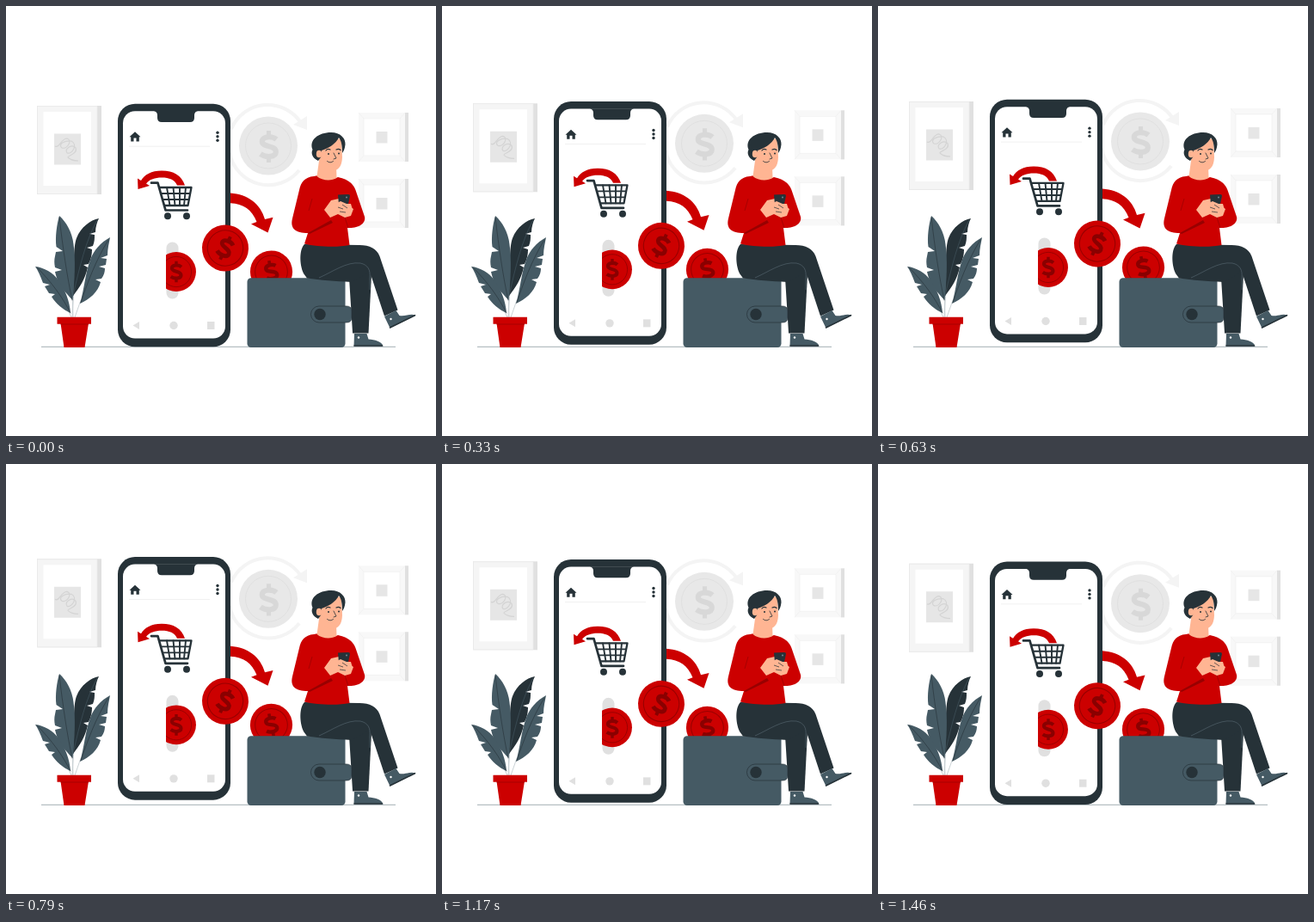
These frames come from a looping animation (500x500 px, 1500 ms). An HTML page:

```html
<!DOCTYPE html>
<html lang="en">
<head>
<meta charset="utf-8">
<title>Mobile cashback</title>
<style>
  html, body { margin: 0; width: 100%; height: 100%; overflow: hidden; background: #fff; }
  svg { display: block; width: 100%; height: 100%; }
  .dark { fill: #263238; }
  .slate { fill: #455a64; }
  .red { fill: #c00; }
  .skin { fill: #ffb593; }
  .line { fill: none; stroke: #263238; stroke-linecap: round; stroke-linejoin: round; }
</style>
</head>
<body>
<svg viewBox="0 0 500 500">
  <defs>
    <g id="dollar" fill="none" stroke-width="4.8">
      <path d="M7-6.500C3-10-6-9.500-6-4.600C-6 1 6.500-1.600 6.500 4.700C6.500 10-3 10-7.500 6.600"/>
      <path d="M0-14.500V-8M0 8V14.500" stroke-width="4"/>
    </g>
    <g id="coin">
      <circle class="red" r="27"/>
      <circle r="20.700" fill="none" stroke="#900" stroke-width="1.100"/>
      <use href="#dollar" stroke="#8a0000"/>
    </g>
    <g id="frame">
      <path d="M0 0H58V57H0z" fill="#f8f8f8"/>
      <path d="M54 0H58V57H54z" fill="#e0e0e0"/>
      <path d="M6 7H48V50H6z" fill="#fff"/>
      <path d="M0 0L6 7H48L54 0M0 57L6 50H48L54 57M6 7V50M48 7V50" fill="none" stroke="#efefef" stroke-width=".7"/>
      <path d="M20.500 22H33.500V35.500H20.500z" fill="#e6e6e6"/>
    </g>
    <clipPath id="slot"><path d="M186 280H230V340H186z"/></clipPath>
  </defs>

  <path d="M41 396.300H453" stroke="#455a64" stroke-width=".5"/>

  <g id="floating">
    <!-- wall -->
    <path d="M36 116H111V219H36z" fill="#e0e0e0"/>
    <path d="M36.500 116.500H106V218.500H36.500z" fill="#f5f5f5" stroke="#ebebeb" stroke-width=".7"/>
    <path d="M43.500 123H99V209H43.500z" fill="#fff"/>
    <path d="M56 148.500H87V184.500H56z" fill="#e6e6e6"/>
    <path d="M57 163C62 166 64 154 71 154C78 156 71 167 65 165C60 161 68 156 76 157C84 161 77 173 71 171C67 166 77 160 81 165C84 172 71 174 72 176C75 179 79 180 84 180" fill="none" stroke="#d4d4d4" stroke-width="1.200"/>
    <use href="#frame" x="410" y="124"/>
    <use href="#frame" x="410" y="201"/>

    <!-- wall coin -->
    <path d="M262 143A46 46 0 0 1 343 136M341 191A46 46 0 0 1 260 171" fill="none" stroke="#f4f4f4" stroke-width="4"/>
    <path d="M350 128V144L334 138z" fill="#f4f4f4"/>
    <circle cx="305" cy="162.500" r="34" fill="#e8e8e8"/>
    <circle cx="305" cy="162.500" r="26.500" fill="none" stroke="#dedede" stroke-width=".8"/>
    <use href="#dollar" transform="translate(305.500 163.500) scale(1.280)" stroke="#d8d8d8"/>

    <!-- phone -->
    <rect class="dark" x="130" y="113.700" width="131" height="282.600" rx="20"/>
    <rect x="136" y="122.200" width="119" height="264.300" rx="14" fill="#fff"/>
    <path class="dark" d="M172 122H223Q219 123 219 127V130Q219 135 214 135H181Q176 135 176 130V127Q176 123 172 122z"/>
    <path class="dark" d="M150 146.300L156.500 152.300H154.800V157.500H151.500V153.500H148.500V157.500H145.200V152.300H143.500z"/>
    <g class="dark">
      <circle cx="246" cy="147.200" r="1.700"/>
      <circle cx="246" cy="151.700" r="1.700"/>
      <circle cx="246" cy="156.200" r="1.700"/>
    </g>
    <path d="M143 163.200H237" stroke="#ececec" stroke-width=".8"/>
    <g fill="#e0e0e0">
      <path d="M155 367V376L147.500 371.500z"/>
      <circle cx="195" cy="371.500" r="4.700"/>
      <path d="M234 367H242.500V376H234z"/>
      <rect x="186.500" y="274.500" width="14" height="66" rx="7"/>
    </g>

    <!-- cart -->
    <path class="red" d="M208 208.500C204 197 195 191.500 181 191.500C169 191.500 161 196 157 203L153 200.500L153.500 213L167 209L163 206.500C167 201.500 173 199.500 181 199.500C190 199.500 196 202 199 208.500z"/>
    <g class="line" stroke-width="2.700">
      <path d="M169 205.700H176.500L185.500 237.500H211"/>
      <path d="M178.500 211H215.500L211.500 232H184.500" stroke-width="2.300"/>
      <path d="M180.500 218H214M182.500 225H212.500M187 211L190.500 232M194.500 211L196.500 232M202 211V232M209 211L207 232" stroke-width="1.900"/>
    </g>
    <circle class="dark" cx="188" cy="244.300" r="4"/>
    <circle class="dark" cx="210" cy="244.300" r="4"/>

    <!-- payback -->
    <path class="red" d="M261 217.500C281 219 296 230 301 248L310.500 245.700L304.500 263.500L285 253.500L291.500 251C286 237 276 230 261 229.300z"/>
    <g clip-path="url(#slot)"><use href="#coin" transform="translate(198 309) scale(.850)"/></g>
    <use href="#coin" transform="translate(255 281.500) rotate(24)"/>
    <use href="#coin" transform="translate(308.500 309) scale(.910) rotate(-12)"/>
  </g>

  <!-- plant -->
  <path d="M77 335L78 362M79 330L77 362M87 342L80 362M70 350L76 362" fill="none" stroke="#c5cdd1" stroke-width=".9"/>
  <path class="dark" d="M108 247C98 249 87 257 82 270C78 280 79 305 78 337C85 328 92 318 95 304L90 301L96 300C99 294 100 289 100 283L94 281L101 279C103 274 103 270 103 266L97 265L104 263C104 257 106 251 108 247z"/>
  <path class="slate" d="M62 244C70 251 77 263 78.500 277C81 294 80 319 77.500 342C69 333 61 325 58 313L57 309L65 307L57 304C56 299 56 295 57 291L58 286L66 285L58.500 280C57 269 59 254 62 244z"/>
  <path class="slate" d="M121 269C110 275 102 284 98 295C92 311 91 330 86 346C97 341 107 333 110 321L104 318L111 317C114 313 115 309 115 305L108 303L116 301L117 294L110 293L118 290C118 282 120 275 121 269z"/>
  <path class="slate" d="M34 303C44 304 55 310 61 319C69 330 74 343 75 357C66 353 58 346 53 338L57 335L50 334L45 326L51 324L43 322C40 314 37 307 34 303z"/>
  <path class="line" d="M62 246C66 280 71 315 77 342M119 272C104 296 94 324 87 345M36 304C53 321 66 339 75 357" stroke-width=".6"/>
  <path d="M106 249C93 272 85 305 78 337" fill="none" stroke="#455a64" stroke-width=".6"/>
  <path class="red" d="M63.500 369H96L91.500 397H67.500zM59.500 361.700H99V369.700H59.500z"/>
  <path d="M63.500 370H96" stroke="#900" stroke-width=".7"/>

  <!-- wallet and legs -->
  <rect class="slate" x="280.500" y="316.300" width="114" height="80.700" rx="4.500"/>
  <path class="dark" d="M399 316L403 380.500H421.500L425 312L420 298z"/>
  <path class="dark" d="M347 277C341 283 341 300 346 311L350 316.500C366 319 382 320 402 321L423 309L440 360.500L455.500 353.500L434.500 291C431 282 423 278 411 278z"/>
  <path d="M364 316C380 309 396 297 412 299C421 301 424 307 423 316V330" fill="none" stroke="#596b74" stroke-width=".6"/>
  <path class="slate" d="M440 361L453.500 354L457.500 360C464 361.500 470 357 476 359.500L446.500 374.500zM405 381H419.500L421.500 387.500C429 388 437 390 438.500 395.500H404.500z"/>
  <path class="line" d="M446.500 374L475.500 359.700M405 395H437.500" stroke-width="1.600"/>
  <circle cx="447.500" cy="364" r="1.200" fill="#fff"/>
  <circle cx="410" cy="385.500" r="1.200" fill="#fff"/>
  <path class="slate" d="M364 349H396Q402 349 402 355V362Q402 368 396 368H364A9.500 9.500 0 0 1 364 349z" stroke="#263238" stroke-width=".7"/>
  <circle class="dark" cx="365" cy="358.500" r="6.700"/>

  <!-- body -->
  <path class="red" d="M358 198C347 199 343 205 341 214L333 247C330 259 337 264 351 264L347 276.500C362 280 385 281 399.500 278L397 258C409 259 419 253 417 245L407.500 217C405 208 400 202 386 199C378 203 370 202 363 197z"/>
  <path d="M351 264L378 249L380 252L353 265z" fill="#900"/>
  <path d="M352 238L356 224M398 258L394 246" fill="none" stroke="#900" stroke-width=".7"/>
  <path class="skin" d="M364 180L361.500 198C367 203 378 204 384.500 200L384 186z"/>
  <path class="skin" d="M364 160C361 176 364 189 376 191.500C385 193 390.500 188 391 176L390 155L376 152z"/>
  <path class="dark" d="M356.500 167C352 156 363 147 378 147C389 147 395 154 394.500 161C394 166 392.500 169 391 171C391 162 390 157 387 153C384 160 374 166 367 168L366 176L363 180C357 177 354 172 356.500 167z"/>
  <ellipse class="skin" cx="364" cy="172" rx="3.200" ry="4.300"/>
  <g class="line" stroke-width=".9">
    <path d="M372 168Q374 165.500 377 167M384 167Q387 165.500 389 167.500" stroke-width="1.200"/>
    <path d="M373.500 180.500Q377 183.500 380.500 180.500M381 171L384 177L381 178" stroke-width=".8"/>
  </g>
  <circle class="dark" cx="375" cy="172" r="1"/>
  <circle class="dark" cx="387" cy="171.500" r="1"/>

  <!-- hands -->
  <path class="skin" d="M370 237L378 226L387 224L391 229L398 232L404 236L401 244L394 246L386 242L377 246z"/>
  <path class="dark" d="M386 219.500L398 219Q400 219 400 221L398 230L387 231z"/>
  <path class="skin" d="M383 230L389 227L396 230L401 230L403 237L395 240L386 237z"/>
  <path d="M386 234L392 236M388 239L395 240M391 231L397 235" fill="none" stroke="#263238" stroke-width=".7"/>
  <circle cx="396" cy="222.500" r=".9" fill="#78909c"/>
</svg>
<script>
  const LOOP = 1500, LIFT = 6;
  const floating = document.getElementById('floating');

  // Linear rise and fall, peaking halfway through the loop
  function draw() {
    const phase = performance.now() % LOOP / LOOP;
    const y = -LIFT * (1 - Math.abs(1 - 2 * phase));
    floating.setAttribute('transform', `translate(0 ${y.toFixed(3)})`);
    requestAnimationFrame(draw);
  }
  draw();
</script>
</body>
</html>
```
